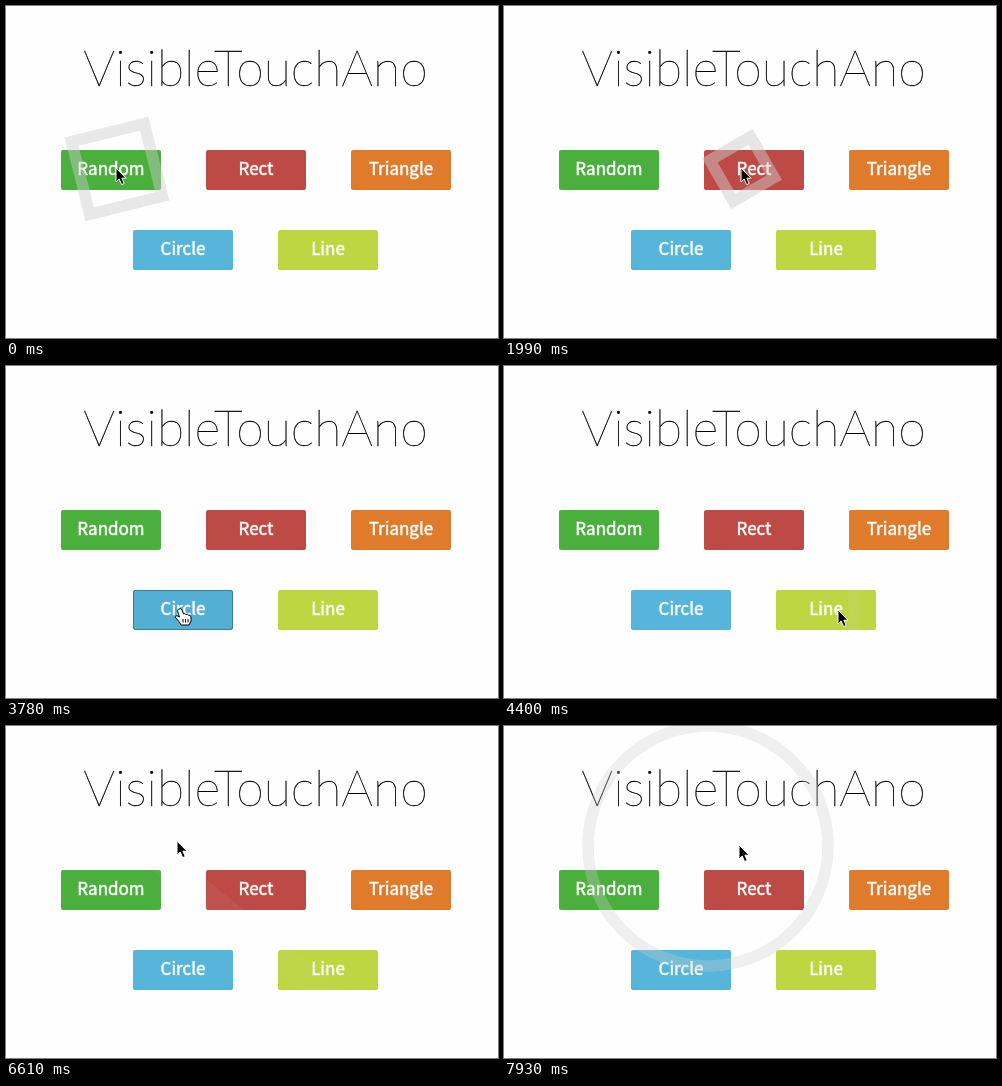
An HTML page for the animation above (7.99 s loop, 492 by 332 pixels).

```html
<!DOCTYPE html>
<html lang="en">
<head>
<meta charset="utf-8">
<title>Touch effects</title>
<style>
html, body { margin: 0; width: 100%; height: 100%; overflow: hidden; background: #fefefe; }
svg { display: block; }
text { text-anchor: middle; font-kerning: none; }
.title { font: 100 50px Lato, sans-serif; stroke: #000; stroke-width: .35px; }
.label { font: 500 17px "Noto Sans CJK JP", "Noto Sans CJK", "Noto Sans", sans-serif; fill: #fff; stroke: #fff; stroke-width: .5px; }
</style>
</head>
<body>
<svg width="492" height="332" viewBox="0 0 492 332">
  <defs><clipPath id="onButtons"></clipPath></defs>
  <text class="title" x="249.5" y="80">VisibleTouchAno</text>
  <g id="buttons"></g>
  <g id="effects" fill="none" stroke="#ccc"></g>
  <g id="cursor" stroke-linejoin="round">
    <path id="arrow" d="M0 0V14L3.2 11 5.6 16.6 8.2 15.5 5.9 10.2H10Z" stroke="#fff"/>
    <path id="hand" fill="#fff" stroke="#000" transform="translate(-2)" d="M-1-1Q1-2 2 0L3.5 4Q5 3 6 4.5 7.5 3.8 8.5 5.2 10.5 4.8 11 7V11L9 15H1L-1 11.5-5 7Q-4.5 5-2.5 6L-.5 7-2.5 1Q-2.5-.5-1-1ZM3 9V12.5M5.5 9V12.5M8 9V12.5"/>
  </g>
</svg>
<script>
const LOOP = 7990, LIFE = 750, REACH = 187, PRESS = 160;
const $ = id => document.getElementById(id);

function add(parent, tag, attrs, text = '') {
  const el = document.createElementNS('http://www.w3.org/2000/svg', tag);
  for (const k in attrs) el.setAttribute(k, attrs[k]);
  el.textContent = text;
  return parent.appendChild(el);
}

const colours = { Random: '#4baf3e', Rect: '#be4a45', Triangle: '#e07b2c', Circle: '#56b5da', Line: '#bed642' };

// Three buttons in the first row, two in the second
const buttons = Object.entries(colours).map(([name, fill], i) => {
  const x = i < 3 ? 55 + 145 * i : 127 + 145 * (i - 3), y = i < 3 ? 144 : 224;
  const box = { x, y, width: 100, height: 40, rx: 2 };
  add($('buttons'), 'rect', { ...box, fill });
  add($('onButtons'), 'rect', box);
  const border = add($('buttons'), 'rect', {
    x: x + .5, y: y + .5, width: 99, height: 39, rx: 2,
    'fill-opacity': .03, stroke: '#000', 'stroke-opacity': .3
  });
  add($('buttons'), 'text', { class: 'label', x: x + 50, y: y + 25 }, name);
  return { x, y, border };
});

const sides = { line: 2, triangle: 3, rect: 4, circle: 90 };

// The cursor rests at each touch, then glides to the next
const touches = [
  { at: -115, x: 111, y: 163, shape: 'rect', turn: 31 },
  { at: 866, x: 111, y: 163, shape: 'circle' },
  { at: 1920, x: 238, y: 163, shape: 'rect', turn: 15 },
  { at: 2900, x: 395, y: 163, shape: 'triangle', turn: -80 },
  { at: 3850, x: 177, y: 245, shape: 'circle' },
  { at: 4690, x: 335, y: 245, shape: 'line', turn: 80 },
  { at: 5950, x: 152, y: 132, shape: 'line', turn: 39 },
  { at: 6770, x: 172, y: 116, shape: 'triangle', turn: -95 },
  { at: 7629, x: 204, y: 120, shape: 'circle' },
  { at: 8090, x: 236, y: 120, shape: 'circle' }
];
for (const touch of touches) touch.el = add($('effects'), 'polygon', {});

function drawTouch({ at, x, y, shape, turn = 0, el }, t) {
  const p = (t - at) / LIFE, on = p >= 0 && p < 1;
  el.style.display = on ? '' : 'none';
  if (!on) return;
  const ease = 1 - (1 - p) ** 2, line = shape === 'line';
  const n = sides[shape], r = line ? 600 : REACH * ease;
  const points = Array.from({ length: n }, (_, i) => {
    const a = (turn + i * 360 / n) * Math.PI / 180;
    return [x + r * Math.cos(a), y + r * Math.sin(a)];
  });
  const alpha = .53 * (1 - p);
  el.setAttribute('points', points.join(' '));
  el.setAttribute('stroke-width', line ? 12 + 16 * ease : 11.5);
  el.setAttribute('opacity', alpha);
  // Faint strokes only show on the coloured buttons
  el.setAttribute('clip-path', alpha < .2 ? 'url(#onButtons)' : 'none');
}

function drawCursor(t) {
  const i = touches.findIndex(touch => touch.at > t);
  const from = touches[i - 1], to = touches[i];
  const part = (t - from.at) / (to.at - from.at);
  const p = Math.min(1, Math.max(0, (part - .5) / .15));
  const x = from.x + (to.x - from.x) * p, y = from.y + (to.y - from.y) * p;
  const pressing = to.at - t <= PRESS;
  let over = false;
  for (const b of buttons) {
    const hit = pressing && x > b.x && x < b.x + 100 && y > b.y && y < b.y + 40;
    b.border.style.display = hit ? '' : 'none';
    over ||= hit;
  }
  $('arrow').style.display = over ? 'none' : '';
  $('hand').style.display = over ? '' : 'none';
  $('cursor').setAttribute('transform', `translate(${x - 1} ${y - 1})`);
}

function draw(t) {
  touches.forEach(touch => drawTouch(touch, t));
  drawCursor(t);
}

let began;
function tick(now) {
  began ??= now;
  draw((now - began) % LOOP);
  requestAnimationFrame(tick);
}
draw(0);
requestAnimationFrame(tick);
</script>
</body>
</html>
```
